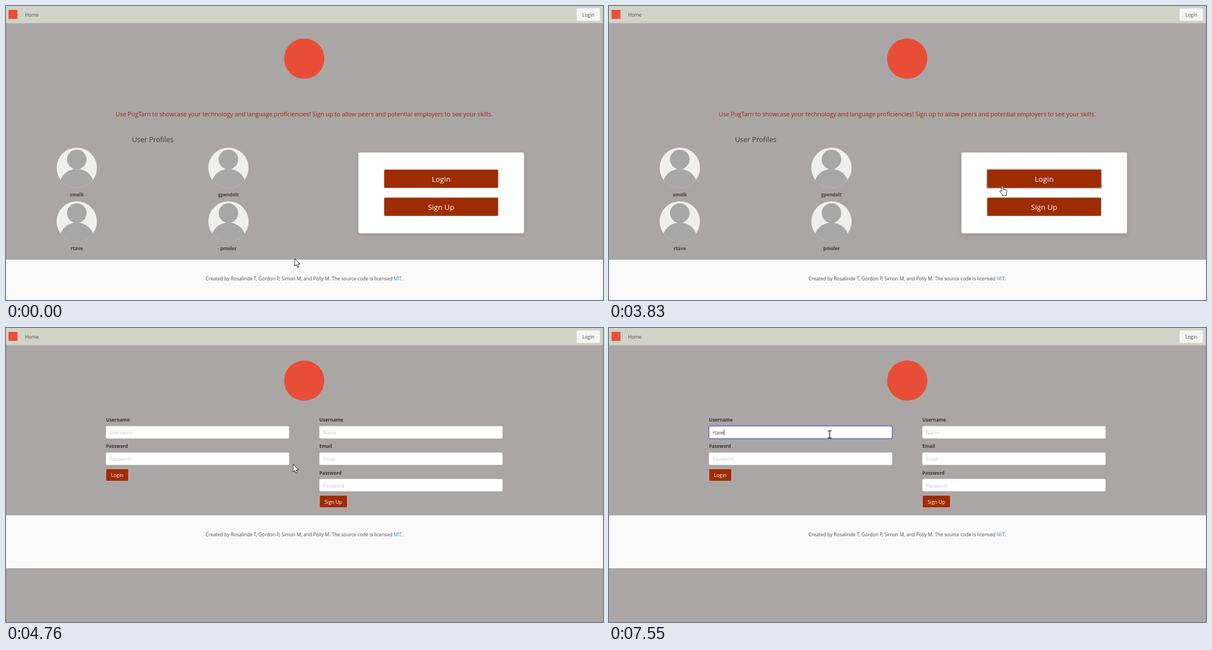
These frames come from a looping animation (1066x525 px, 8000 ms). An HTML page:

```html
<!DOCTYPE html>
<html lang="en">
<head>
<meta charset="utf-8">
<title>Skill profiles</title>
<style>
  html, body { margin: 0; width: 100%; height: 100%; overflow: hidden; background: #aaa6a5; }
  svg { display: block; width: 100vw; height: 100vh; }
  text { font: 8.54px "Open Sans", "Noto Sans", sans-serif; fill: #4a4a4a; }
  .mid { text-anchor: middle; }
  .bold { font-size: 8.25px; font-weight: 700; fill: #363636; }
  .user { fill: #443c44; }
  .lead { font-size: 10.71px; fill: #9f2b03; }
  .title { font-size: 12.5px; fill: #443a40; }
  .big { font-size: 13.2px; fill: #fff; }
  .small { font-size: 8.75px; fill: #fff; }
  .hint { font-size: 8.35px; fill: #c8c8c8; }
  .typed { font-size: 8.5px; fill: #363636; }
  .link { fill: #4a82c4; }
  .button { fill: #9f2b03; stroke: #dbdbdb; stroke-width: .6; }
  .field { fill: #fff; stroke: #dbdbdb; stroke-width: .6; }
  .hover { stroke: #b5b5b5; }
  .focus { stroke: #485fc7; stroke-width: .9; }
  .ring { fill: none; stroke: #485fc7; stroke-opacity: .3; stroke-width: 1.4; }
  .card { fill: #fff; filter: drop-shadow(0 3px 4px rgba(10, 10, 10, .1)); }
  .pointer { fill: #fff; stroke: #111; stroke-width: .9; stroke-linejoin: round; }
</style>
</head>
<body>
<svg id="stage" viewBox="0 0 1066 525" preserveAspectRatio="none"></svg>
<script>
const LOOP = 8000;
const FORM_AT = 3970, LOADED_AT = 4040, LEAVE_AT = 4430, FOCUS_AT = 5520;
const USERNAME = "rtave";
const KEY_TIMES = [6570, 6830, 7030, 7350, 7550];

// Each move: start, end, steps, x, y, easing power
const START = { x: 515.5, y: 451 };
const MOVES = [
  [170, 300, 3, 510.5, 446.5, 1],
  [500, 920, 7, 541, 440.5, 1],
  [1450, 1720, 5, 574, 392.5, 1],
  [1790, 2190, 7, 655, 340.5, 1.5],
  [2260, 2870, 10, 702.5, 321.5, 1.5],
  [4430, 5180, 12, 397, 196, 1.8],
  [5240, 5380, 3, 394, 190.7, 1],
  [5920, 6040, 2, 394, 190, 1]
];

const label = (x, y, cls, str, extra = "") =>
  `<text x="${x}" y="${y}" class="${cls}" ${extra}>${str}</text>`;

const box = (x, y, w, h, cls, r = 2, extra = "") =>
  `<rect x="${x}" y="${y}" width="${w}" height="${h}" rx="${r}" class="${cls}" ${extra}/>`;

const avatar = (x, y, name) => `
  <g transform="translate(${x} ${y})">
    <circle r="36" fill="#efefee"/>
    <g clip-path="url(#disc)" fill="#a7a7a7">
      <circle cy="-15" r="17.5"/>
      <ellipse cy="32" rx="31" ry="30"/>
    </g>
    ${label(0, 51.2, "bold user mid", name)}
  </g>`;

const bigButton = (y, str) =>
  box(675, y, 204, 33, "button", 2, 'data-page="home"') + label(777, y + 22.2, "big mid", str);

const smallButton = (x, y, w, str) =>
  box(x, y, w, 21.8, "button") + label(x + w / 2, y + 14.6, "small mid", str);

const field = (x, y, name, hint) =>
  label(x, y - 8, "bold", name) +
  box(x, y, 327, 22, "field", 2, 'data-page="form"') +
  label(x + 6.5, y + 14.9, "hint", hint);

const footer = (y, h) => `
  <rect y="${y}" width="1066" height="${h}" fill="#fafafa"/>
  ${label(532.5, y + 37.2, "mid", "Created by Rosalinde T, Gordon P, Simon M, and Polly M. " +
    'The source code is licensed <tspan class="link">MIT</tspan>.')}`;

const stage = document.getElementById("stage");
stage.innerHTML = `
  <defs><clipPath id="disc"><circle r="36"/></clipPath></defs>
  <rect width="1066" height="525" fill="#aaa6a5"/>
  <rect width="1066" height="30.7" fill="#d1d3c9"/>
  ${label(34, 18.6, "", "Home", 'id="homeLink"')}
  ${box(1019, 4.2, 41.5, 22.3, "", 2, 'fill="#f5f5f4"')}
  ${label(1039.8, 18.6, "mid", "Login")}
  <g id="brand" fill="#e84e36">
    <rect x="4.5" y="7" width="16" height="16"/>
    <circle cx="532.5" cy="94" r="36"/>
  </g>
  <g id="home">
    ${label(532.3, 196.6, "lead mid", "Use PugTarn to showcase your technology and language proficiencies! " +
      "Sign up to allow peers and potential employers to see your skills.")}
    ${label(225, 243.3, "title", "User Profiles")}
    ${avatar(126.4, 289, "smelk")}
    ${avatar(397.2, 289, "gpendolt")}
    ${avatar(126.4, 384.8, USERNAME)}
    ${avatar(397.2, 384.8, "pmoler")}
    ${box(629.3, 261.5, 295.6, 144.5, "card", 3.3)}
    ${bigButton(292, "Login")}
    ${bigButton(342, "Sign Up")}
    ${box(674, 291, 206, 35, "ring", 3, 'id="buttonRing"')}
    ${footer(453, 72)}
  </g>
  <g id="form">
    ${field(178.5, 175.2, "Username", "Username")}
    ${field(178.5, 222.4, "Password", "Password")}
    ${smallButton(178.5, 251.6, 40.3, "Login")}
    ${field(559.6, 175.2, "Username", "Name")}
    ${field(559.6, 222.4, "Email", "Email")}
    ${field(559.6, 269.6, "Password", "Password")}
    ${smallButton(559.8, 298.9, 49.6, "Sign Up")}
    ${box(177.6, 174.3, 328.8, 23.8, "ring", 2.6, 'id="fieldRing"')}
    ${label(185, 190.1, "typed", "", 'id="typed"')}
    <rect id="caret" y="180.8" width=".8" height="11" fill="#333"/>
    <g id="formFooter">${footer(334.5, 94.5)}</g>
  </g>
  <g id="cursor">
    <path id="arrow" class="pointer" d="M0 0V13.6L3 10.8 5.2 15.8 7.5 14.8 5.3 10H9.6Z"/>
    <path id="hand" class="pointer" d="M-1.4 1.2C-1.4-.5 1.3-.5 1.3 1.2V5.8L6.3 6.9Q8.2 7.4 8 9.4L7 13.6V16.8H-.2V14.8L-4.6 10.2C-5.6 8.8-3.8 7.5-2.6 8.7L-1.4 9.9Z"/>
    <path id="beam" d="M-3.5-6.4H3.5M0-6.4V6.4M-3.5 6.4H3.5" fill="none" stroke="#1c1c1c" stroke-width="1.3"/>
  </g>`;

const $ = id => document.getElementById(id);
const show = (id, on) => { $(id).style.display = on ? "" : "none"; };
const targets = [...stage.querySelectorAll("[data-page]")].map(el => {
  const [x, y, w, h] = ["x", "y", "width", "height"].map(a => +el.getAttribute(a));
  return { el, page: el.dataset.page, x, y, w, h };
});
const usernameField = targets.find(b => b.page === "form").el;

function cursorAt(t) {
  let { x, y } = START;
  for (const [start, end, steps, toX, toY, power] of MOVES) {
    if (t < start) break;
    const gap = (end - start) / (steps - 1);
    const step = Math.min(steps, Math.floor((t - start) / gap + 1e-6) + 1);
    const p = 1 - (1 - step / steps) ** power;
    x += (toX - x) * p;
    y += (toY - y) * p;
  }
  return { x, y };
}

function render(t) {
  const page = t < FORM_AT ? "home" : "form";
  const loaded = page === "home" || t >= LOADED_AT;
  const focused = t >= FOCUS_AT;
  show("home", page === "home");
  show("form", page === "form");
  show("brand", loaded);
  show("formFooter", loaded);
  $("homeLink").setAttribute("x", loaded ? 34 : 18);

  const { x, y } = cursorAt(t);
  let over = null;
  for (const b of targets) {
    const hit = b.page === page && x >= b.x && x <= b.x + b.w && y >= b.y && y <= b.y + b.h;
    if (hit) over = b;
    b.el.classList.toggle("hover", hit);
  }
  usernameField.classList.toggle("focus", focused);
  show("fieldRing", focused);
  show("buttonRing", t >= 3760);

  const hand = page === "home" ? over : t < LEAVE_AT;
  const beam = page === "form" && over;
  show("hand", hand);
  show("beam", beam);
  show("arrow", !hand && !beam);
  $("cursor").setAttribute("transform", `translate(${x} ${y})`);

  const count = KEY_TIMES.filter(k => t >= k).length;
  const typed = $("typed");
  typed.textContent = USERNAME.slice(0, count);
  usernameField.nextElementSibling.style.display = count ? "none" : "";
  const width = count ? typed.getComputedTextLength() : 0;
  $("caret").setAttribute("x", 185 + width);
  show("caret", focused && (t < 6040 || count));
}

const begin = performance.now();
function tick() {
  render((performance.now() - begin) % LOOP);
  requestAnimationFrame(tick);
}
tick();
</script>
</body>
</html>
```
